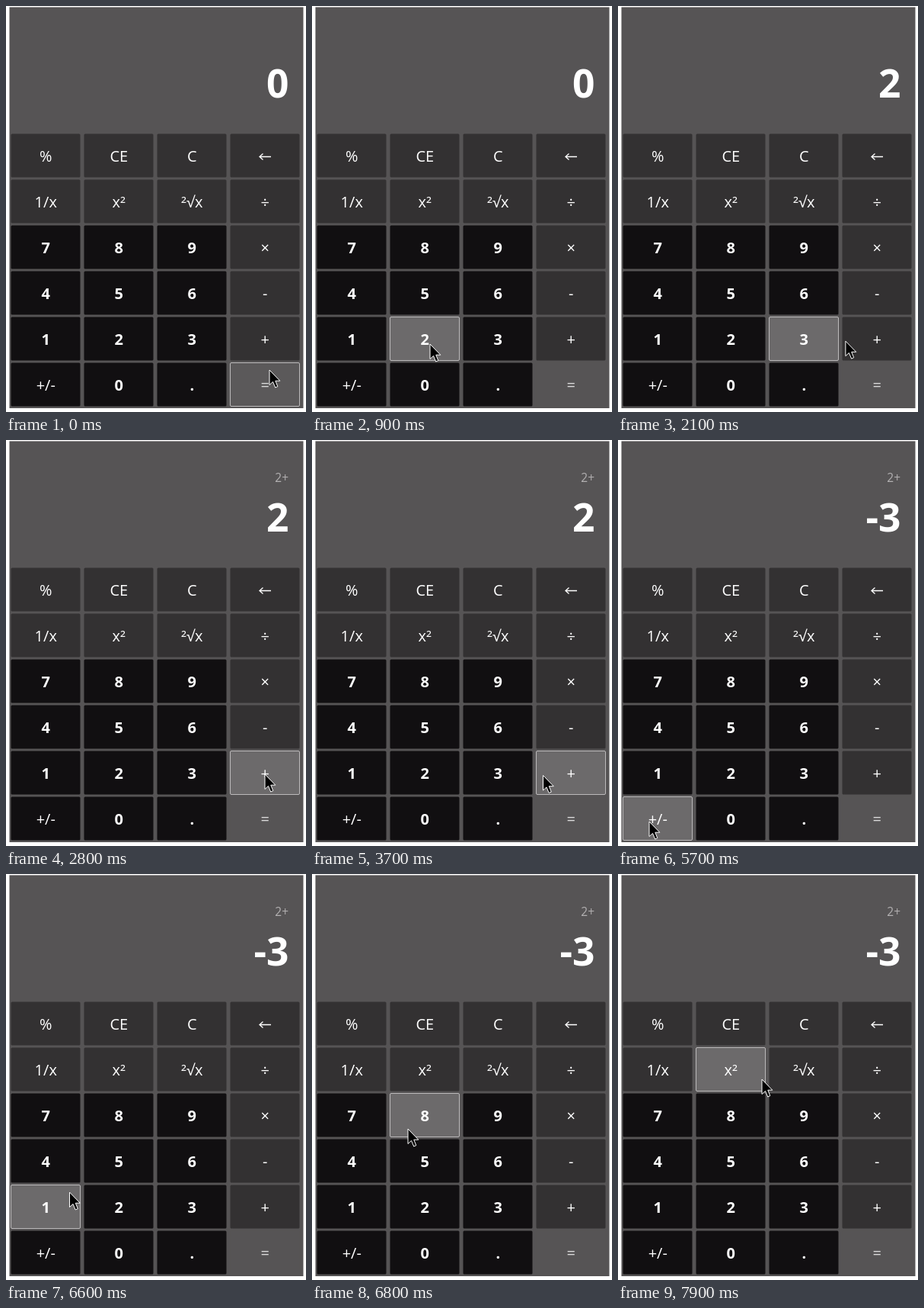
An HTML page that plays this animation: 394 by 532 pixels, repeating every 8000 ms.

```html
<!DOCTYPE html>
<html lang="en">
<head>
<meta charset="utf-8">
<title>Calculator</title>
<style>
  html, body { margin: 0; width: 100%; height: 100%; overflow: hidden; background: #fff; }
  svg { display: block; width: 394px; height: 532px; }
  text { font: 500 20px "Open Sans", "Noto Sans", sans-serif; fill: #fff; text-anchor: middle; }
  .num text { font-weight: 700; }
  .op rect { fill: #333132; }
  .num rect, .sign rect { fill: #110f11; }
  .eq rect { fill: #565455; }
  .eq text { fill: #dedede; }
  .hover rect { fill: #6c6a6b; stroke: #bcbabb; }
  .eq.hover rect { fill: #5b595a; }
  #value { font-size: 51.5px; font-weight: 700; text-anchor: end; }
  #expr { font-size: 15.5px; fill: #b2b0b1; text-anchor: end; }
</style>
</head>
<body>
<svg viewBox="0 0 394 532">
  <rect x="4.5" y="1.5" width="386" height="525.5" fill="#565455"/>
  <text id="expr" x="371" y="54.5"></text>
  <text id="value" x="371.5" y="119.5"></text>
  <g id="keys"></g>
  <path id="cursor" d="M0 0V19.5L4.5 15.4L7.7 23L10.8 21.6L7.8 14.2H13.8Z"
        fill="#000" stroke="#fff"/>
</svg>
<script>
const LOOP = 8000, STEP = 100, HOVER_LAG = 25;
const COL = 96, ROW = 60, LEFT = 6.5, TOP = 167.5;

const labels = [
  ['%', 'CE', 'C', '←'],
  ['1/x', 'x²', '²√x', '÷'],
  ['7', '8', '9', '×'],
  ['4', '5', '6', '-'],
  ['1', '2', '3', '+'],
  ['+/-', '0', '.', '=']
];

// The pointer rests between moves.
const home = { x: 346, y: 477 };
const moves = [
  { from: 0, to: 900, x: 155, y: 443 },
  { from: 1400, to: 2300, x: 340, y: 438 },
  { from: 3300, to: 4100, x: 267, y: 441 },
  { from: 4200, to: 5000, x: 41, y: 500 },
  { from: 6400, to: 6800, x: 126, y: 334 },
  { from: 6800, to: 7300, x: 150, y: 266 },
  { from: 7300, to: 7900, x: 189, y: 269 }
];
const presses = [
  { at: 1200, key: '2' },
  { at: 2800, key: '+' },
  { at: 4200, key: '3' },
  { at: 5400, key: '+/-' }
];

const $ = id => document.getElementById(id);

function add(parent, tag, attrs) {
  const el = document.createElementNS('http://www.w3.org/2000/svg', tag);
  for (const name in attrs) el.setAttribute(name, attrs[name]);
  return parent.appendChild(el);
}

function keyClass(label, row, col) {
  if (label === '=') return 'eq';
  if (label === '+/-') return 'sign';
  return row > 1 && col < 3 ? 'num' : 'op';
}

function makeKey(label, row, col) {
  const x = LEFT + col * COL, y = TOP + row * ROW;
  const key = add($('keys'), 'g', { class: keyClass(label, row, col) });
  add(key, 'rect', { x, y, width: 91, height: 57, rx: 1.5 });
  if (label === '←') {
    add(key, 'path', {
      d: `M${x + 53.5} ${y + 30}h-15m4.5 -4l-4.5 4l4.5 4`,
      fill: 'none', stroke: '#fff', 'stroke-width': 1.3
    });
  } else {
    add(key, 'text', { x: x + 45.75, y: y + 36.5 }).textContent = label;
  }
  return key;
}

const keys = labels.map((line, row) => line.map((label, col) => makeKey(label, row, col)));

function pointAt(t) {
  let { x, y } = home;
  for (const m of moves) {
    const k = Math.min(1, Math.max(0, (t - m.from) / (m.to - m.from)));
    x += (m.x - x) * k;
    y += (m.y - y) * k;
  }
  return { x, y };
}

function displayAt(t) {
  let value = '0', expr = '';
  for (const { at, key } of presses) {
    if (at > t) break;
    if (key === '+') expr = value + '+';
    else if (key === '+/-') value = String(-value);
    else value = key;
  }
  return { value, expr };
}

function keyAt({ x, y }) {
  return keys[Math.floor((y - TOP) / ROW)][Math.floor((x - LEFT) / COL)];
}

function draw(t) {
  const { x, y } = pointAt(t);
  const { value, expr } = displayAt(t);
  $('cursor').setAttribute('transform', `translate(${x} ${y})`);
  $('value').textContent = value;
  $('expr').textContent = expr;

  const hovered = keyAt(pointAt(t - HOVER_LAG));
  for (const key of keys.flat()) key.classList.toggle('hover', key === hovered);
}

const start = performance.now();
function tick() {
  const t = (performance.now() - start) % LOOP;
  draw(Math.floor(t / STEP) * STEP);
  requestAnimationFrame(tick);
}
tick();
</script>
</body>
</html>
```
